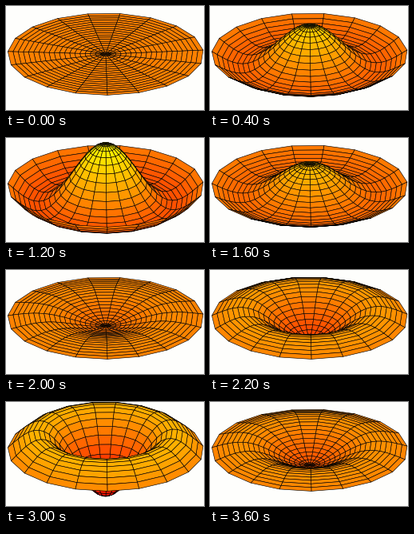
A matplotlib script for the animation above (3.8 s loop, 248 by 130 pixels).

```python
import numpy as np
import matplotlib.pyplot as plt
from matplotlib.animation import FuncAnimation
from matplotlib.collections import PolyCollection

W, H, DPI = 248, 130, 100
FRAMES, STEP_MS = 19, 200
N = 19                       # rings and sectors of the membrane mesh
CX, CY = 124.8, 60.2         # centre of the resting disc
RX, RY = 122.7, 51.2         # half axes of the projected disc
AMP = 58.0                   # peak height on screen
ROOT = 5.5200781             # second zero of J0
LINE_PX = 0.62


def bessel_j0(x):
    t = (np.arange(200) + 0.5) * np.pi / 200
    return np.cos(np.multiply.outer(x, np.sin(t))).mean(axis=-1)


radius = np.linspace(0, 1, N + 1)[:, None]
angle = np.radians(-89) + np.linspace(0, 2 * np.pi, N + 1)[None, :]
px = radius * np.cos(angle)
py = radius * np.sin(angle)
shape = bessel_j0(ROOT * radius) * np.ones_like(angle)
sin_el = RY / RX
cos_el = np.sqrt(1 - sin_el ** 2)
z_scale = AMP / (RX * cos_el)


def quads(a):
    """Corner values of every mesh cell, shape (cells, 4)."""
    corners = [a[:-1, :-1], a[1:, :-1], a[1:, 1:], a[:-1, 1:]]
    return np.stack(corners, axis=-1).reshape(-1, 4)


fig = plt.figure(figsize=(W / DPI, H / DPI), dpi=DPI, facecolor="#fefefc")
ax = fig.add_axes([0, 0, 1, 1])
ax.set(xlim=(0, W), ylim=(H, 0))
ax.axis("off")
mesh = PolyCollection([], edgecolors="black", linewidths=LINE_PX * 72 / DPI,
                      antialiaseds=True, joinstyle="round", snap=False)
ax.add_collection(mesh)


def draw(k):
    z = shape * np.sin(2 * np.pi * k / FRAMES)
    sx = CX + RX * px
    sy = CY - RY * py - AMP * z
    depth = quads(py * cos_el - z * z_scale * sin_el).mean(axis=1)
    order = np.argsort(-depth, kind="stable")
    mesh.set_verts(np.stack([quads(sx), quads(sy)], axis=-1)[order])
    level = quads(z)[order, 0]
    mesh.set_facecolor(plt.cm.autumn((level + 1) / 2))
    return [mesh]


anim = FuncAnimation(fig, draw, frames=FRAMES, interval=STEP_MS,
                     repeat=True, repeat_delay=0, blit=False)
plt.show()
```
